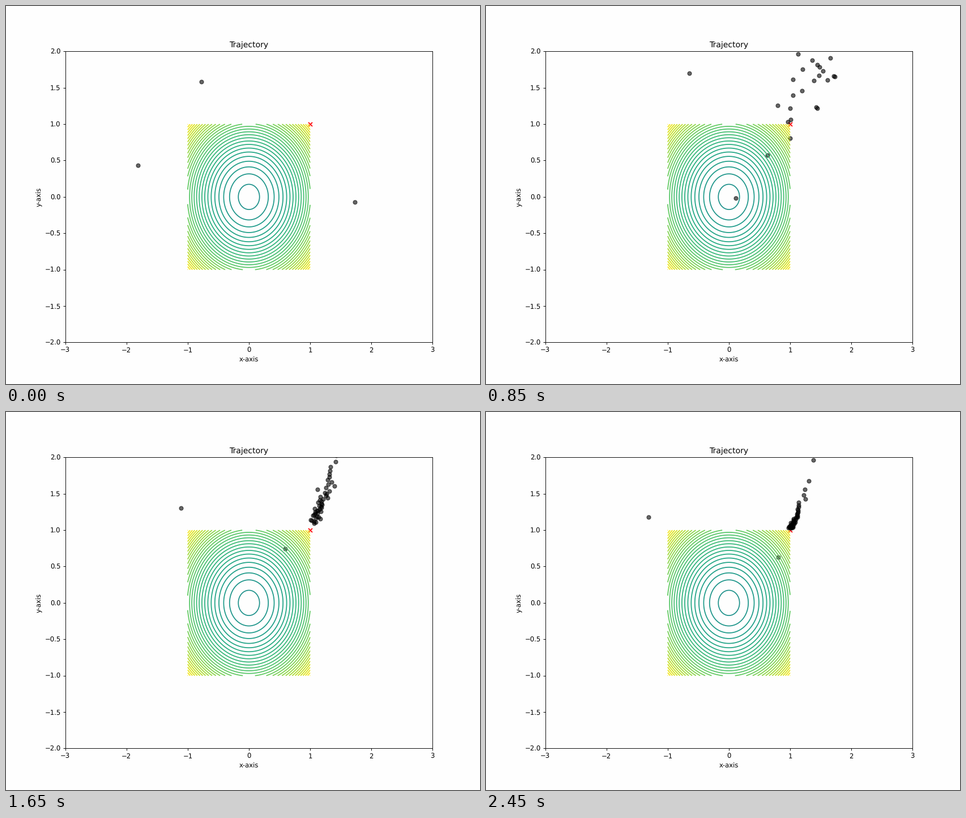
Animation, 837 px wide and 669 px high, one loop 2500 ms. Source, as a matplotlib script:

```python
import numpy as np
import matplotlib.pyplot as plt
from matplotlib.animation import FuncAnimation

W, H, DPI = 837, 669, 83.7
FRAMES, INTERVAL = 50, 50
FOLLOWERS = 47
PAPER = "#fefefe"
rng = np.random.default_rng(12)


def valley(base, depth, power, spread):
    """Particles strewn along y = x**2, densest at the base height."""
    u = (rng.permutation(FOLLOWERS) + 0.5) / FOLLOWERS
    y = base + depth * (-np.log(1 - u)) ** power
    return np.column_stack([np.sqrt(y) + rng.normal(0, spread, FOLLOWERS), y])


def glide(t, times, points):
    """Smooth path through the points, reached at the given times."""
    vel = np.gradient(points, times, axis=0)
    k = min(np.searchsorted(times, t, side="right") - 1, len(times) - 2)
    h = times[k + 1] - times[k]
    u = (t - times[k]) / h
    return ((2 * u**3 - 3 * u**2 + 1) * points[k]
            + (u**3 - 2 * u**2 + u) * h * vel[k]
            + (3 * u**2 - 2 * u**3) * points[k + 1]
            + (u**3 - u**2) * h * vel[k + 1])


def sway(t, times):
    """Fading swing, at rest on every key time."""
    k = min(np.searchsorted(times, t, side="right") - 1, len(times) - 2)
    u = (t - times[k]) / (times[k + 1] - times[k])
    return 0.96**t * np.sin(np.pi * u) ** 2


# Wide start outside the view, then swings around the best point
centre = np.array([1.3, 1.5])
wide = rng.uniform(-10, 10, (300, 2))
hidden = (abs(wide[:, 0]) > 3.1) | (abs(wide[:, 1]) > 2.1)
start = wide[hidden][:FOLLOWERS]
offset = start - centre
swing = centre + offset * rng.uniform(-0.45, 0.45, (FOLLOWERS, 1))
gather = np.column_stack([
    1.3 + offset[:, 0] * rng.uniform(-0.15, 0.15, FOLLOWERS),
    1.3 + abs(offset[:, 1]) * rng.uniform(0, 0.5, FOLLOWERS)])

# The swarm sinks along the valley towards (1, 1)
key_times = np.array([0, 13, 21, 27, 33, 41, 49])
swarm_times = np.insert(key_times, 1, [5, 9])
swarm = np.stack([
    start, swing, gather,
    valley(0.75, 2.10, 0.6, 0.28),
    valley(1.20, 0.60, 0.7, 0.12),
    valley(1.18, 0.50, 0.9, 0.07),
    valley(1.08, 0.40, 0.8, 0.045),
    valley(1.10, 0.15, 1.2, 0.03),
    valley(1.03, 0.13, 1.3, 0.02)])

# Stragglers: places at the key times and direction of the swing
left = [(-0.78, 1.585), (0.085, 1.86), (-0.07, 1.57), (-0.34, 1.78),
        (-1.11, 1.305), (-0.835, 1.26), (-1.31, 1.18)]
low = [(-1.815, 0.43), (0.163, 0.72), (0.015, 0.39), (0.34, 0.615),
       (0.593, 0.745), (0.355, 0.22), (0.805, 0.63)]
late = [(1.73, -0.07), (0.973, 0.89), (1.023, 0.785), (0.83, 1.375),
        (1.11, 1.265), (1.08, 1.19), (1.06, 1.12)]
loners = np.stack([left, low, late], axis=1)
swings = np.array([(-1.4, 0), (0, -1.1), (0, 0)])

plt.rcParams["text.hinting"] = "none"
fig, ax = plt.subplots(figsize=(W / DPI + 1e-6, H / DPI + 1e-6), dpi=DPI,
                       facecolor=PAPER)
fig.subplots_adjust(left=0.125, right=0.9, bottom=0.11, top=0.88)
ax.set_facecolor(PAPER)
ax.set_title("Trajectory", fontsize="large")
ax.set_xlabel("x-axis", fontsize="medium")
ax.set_ylabel("y-axis", fontsize="medium")
ax.set_xlim(-3, 3)
ax.set_ylim(-2, 2)

axis = np.linspace(-1, 0.999, 401)
xx, yy = np.meshgrid(axis, axis)
ax.contour(xx, yy, xx**2 + yy**2, levels=np.arange(-2.0, 2.0, 0.07))
ax.scatter(1, 1, color="red", marker="x")
dots = ax.scatter([], [], c="black", alpha=0.6, edgecolor="black")


def update(i):
    strays = glide(i, key_times, loners) + swings * sway(i, key_times)
    dots.set_offsets(np.vstack([glide(i, swarm_times, swarm), strays]))
    return (dots,)


anim = FuncAnimation(fig, update, frames=FRAMES, interval=INTERVAL,
                     repeat=True, repeat_delay=0)
plt.show()
```
